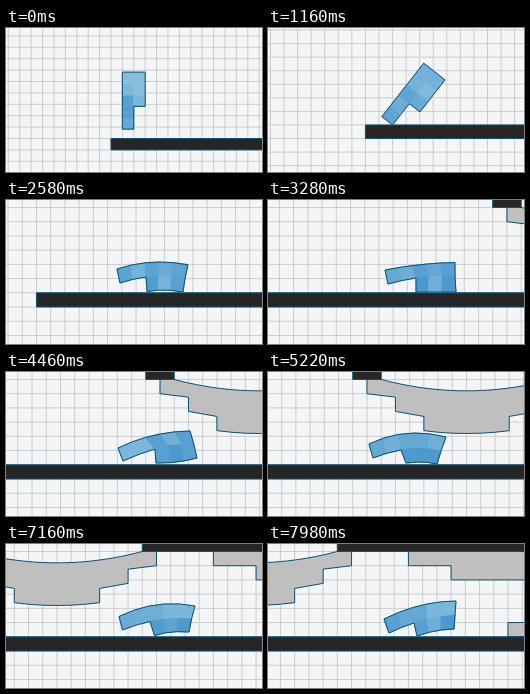
An HTML page with a canvas that plays this animation: 256x144 px, repeating every 8000 ms.

```html
<!DOCTYPE html>
<html lang="en">
<head>
<meta charset="utf-8">
<title>Soft walker</title>
<style>
html, body { margin: 0; width: 100%; height: 100%; overflow: hidden; background: #f4f5f7; }
canvas { display: block; width: 100vw; height: 100vh; }
</style>
</head>
<body>
<canvas id="stage" width="256" height="144"></canvas>
<script>
const ctx = document.getElementById('stage').getContext('2d');
const LOOP = 8000, W = 256, H = 144, CELL = W / 18;
const EDGE = '#0b5075', DARK = '#262627', SOFT = '#bfbfbf';

// [seconds, camera centre in cells]
const CAMERA = [[0, 2.02], [1, 2.15], [1.5, 2.7], [1.88, 3.73], [3.28, 10.2],
  [4.46, 16.17], [5.22, 20.04], [6.34, 25.8], [8, 35.24]];
// [seconds, gait phase]; one gait cycle is six poses
const GAIT = [[0, 0], [1.88, 0], [3.28, 13], [4.46, 20], [5.22, 27], [6.34, 34], [7.98, 47], [8, 47.15]];

// Each pose: top, middle and bottom edge through three points, then cell shades
const POSES = [
  { top: [105, 68, 147, 60, 177, 67], mid: [108, 82, 132, 76, 171, 80], low: [134, 91, 150, 88, 166, 92], shade: '36454364' },
  { top: [117, 70, 159, 64, 187, 62.5], mid: [120, 84, 148, 78, 187, 77], low: [148, 92, 167, 92, 188, 92], shade: '45343252' },
  { top: [112, 76, 154, 62, 184, 59], mid: [117, 89, 149, 77, 188, 73], low: [150, 91, 171, 90, 191, 86], shade: '66353323' },
  { top: [101, 72, 146, 61, 178, 65], mid: [105, 86, 133, 78, 173, 79], low: [138, 91, 154, 90, 169, 92], shade: '45445222' },
  { top: [110, 70, 157, 60, 190, 67], mid: [112, 83, 142, 76, 184, 79], low: [148, 91, 164, 89, 180, 91], shade: '66666222' },
  { top: [116, 75, 159, 60, 188, 57], mid: [121, 89, 146, 79, 187, 71], low: [149, 92, 167, 87, 186, 85], shade: '34466352' }
];
const UPRIGHT_SHADE = '43367677';

const mix = (a, b, k) => a + (b - a) * k;
const mixPoint = (p, q, k) => [mix(p[0], q[0], k), mix(p[1], q[1], k)];
const smooth = (a, b, t) => {
  const k = Math.min(1, Math.max(0, (t - a) / (b - a)));
  return k * k * (3 - 2 * k);
};

function segment(keys, t) {
  let i = 0;
  while (i < keys.length - 2 && t >= keys[i + 1][0]) i++;
  return [i, (t - keys[i][0]) / (keys[i + 1][0] - keys[i][0])];
}

function linear(keys, t) {
  const [i, k] = segment(keys, t);
  return mix(keys[i][1], keys[i + 1][1], k);
}

function spline(keys, t) {
  const [i, k] = segment(keys, t);
  const slope = j => {
    const a = keys[Math.max(0, j - 1)], b = keys[Math.min(keys.length - 1, j + 1)];
    return (b[1] - a[1]) / (b[0] - a[0]);
  };
  const [t0, a] = keys[i], [t1, b] = keys[i + 1], d = t1 - t0;
  return mix(a, b, k * k * (3 - 2 * k)) +
    d * k * (1 - k) * ((1 - k) * slope(i) - k * slope(i + 1));
}

// Parabola through three points placed at the given nodes
function curve(c, nodes, u) {
  const [a, b, d] = nodes;
  const wa = (u - b) * (u - d) / ((a - b) * (a - d));
  const wb = (u - a) * (u - d) / ((b - a) * (b - d));
  const wd = (u - a) * (u - b) / ((d - a) * (d - b));
  return [c[0] * wa + c[2] * wb + c[4] * wd, c[1] * wa + c[3] * wb + c[5] * wd];
}

const lattice = make => [0, 1, 2].map(row =>
  [0, 1, 2, 3, 4, 5].map(i => make(row, i)));

const posePoints = POSES.map(p => lattice((row, i) => curve(
  [p.top, p.mid, p.low][row], [[0, 3, 5], [0, 2, 5], [2, 3.5, 5]][row], i)));

const mixLattice = (a, b, k) => lattice((r, i) => mixPoint(a[r][i], b[r][i], k));
const mixShades = (a, b, k) => [...a].map((v, i) => mix(+v, +b[i], k));

function view(t) {
  const k = smooth(0.2, 1.6, t);
  const size = mix(11.4, CELL, k), ground = mix(110.5, 92.8, k), x = spline(CAMERA, t);
  return { size, ground, x, at: (cx, cy) => [W / 2 + (cx - x) * size, ground - cy * size] };
}

// Standing body tipping over its foot, in cells
function toppling(t) {
  const angle = Math.PI / 2 * Math.min(1, Math.max(0, (t - 0.45) / 1.05)) ** 2.2;
  const c = Math.cos(angle), s = Math.sin(angle);
  const body = lattice((r, i) => [2 + (r - 1) * c + i * s, i * c - (r - 1) * s]);
  const lowest = Math.min(body[0][0][1], body[1][0][1], body[2][2][1]);
  const drop = Math.max(0, 0.82 - 4 * t - 8 * t * t);
  return lattice((r, i) => [body[r][i][0], body[r][i][1] - lowest + drop]);
}

function robot(t, cam) {
  const phase = linear(GAIT, t), n = Math.floor(phase + 1e-6), k = smooth(0, 1, phase - n);
  const a = n % 6, b = (n + 1) % 6;
  let points = mixLattice(posePoints[a], posePoints[b], k);
  let shades = mixShades(POSES[a].shade, POSES[b].shade, k);
  if (t < 1.88) {
    const landed = view(1.88), fall = toppling(t), rest = smooth(1.35, 1.88, t);
    points = lattice((r, i) => {
      const [x, y] = points[r][i];
      const p = [landed.x + (x - W / 2) / CELL, (landed.ground - y) / CELL];
      return cam.at(...mixPoint(fall[r][i], p, rest));
    });
    shades = mixShades(UPRIGHT_SHADE, POSES[0].shade, smooth(0.3, 1.88, t));
  }
  return { points, shades };
}

function shape(points, fill, stroke) {
  ctx.beginPath();
  points.forEach(p => ctx.lineTo(...p));
  ctx.closePath();
  if (fill) { ctx.fillStyle = fill; ctx.fill(); }
  if (stroke) { ctx.strokeStyle = stroke; ctx.lineWidth = 1; ctx.stroke(); }
}

function drawGrid(cam) {
  ctx.fillStyle = '#f4f5f7';
  ctx.fillRect(0, 0, W, H);
  ctx.beginPath();
  const [ox, oy] = cam.at(0, 0), s = cam.size;
  for (let x = ox - Math.floor(ox / s) * s; x < W; x += s) { ctx.moveTo(x, 0); ctx.lineTo(x, H); }
  for (let y = oy % s; y < H; y += s) { ctx.moveTo(0, y); ctx.lineTo(W, y); }
  ctx.strokeStyle = '#cbccce';
  ctx.lineWidth = 1;
  ctx.stroke();
}

function drawWorld(cam) {
  const poly = (cells, fill) => shape(cells.map(p => cam.at(...p)), fill, EDGE);
  const box = (x0, y0, x1, y1, fill) => poly([[x0, y0], [x1, y0], [x1, y1], [x0, y1]], fill);

  // Sagging stepped beam, hung from both ends
  const sag = x => 0.8 * Math.max(0, 1 - ((x - 25) / 6) ** 2);
  const beam = [];
  const add = (x, y) => beam.push([x, y - sag(x)]);
  for (let x = 18; x <= 32; x += 0.5) add(x, 6);
  [[32, 5], [30, 5], [30, 4], [28, 4], [28, 3]].forEach(p => add(...p));
  for (let x = 27; x > 22; x--) add(x, 3);
  [[22, 3], [22, 4], [20, 4], [20, 5], [18, 5]].forEach(p => add(...p));
  poly(beam, SOFT);

  poly([[36, 6], [36, 5], [39, 5], [39, 4], [48, 4], [48, 6]], SOFT);
  box(43, 0, 48, 1, SOFT);
  box(17, 6, 19, 7, DARK);
  box(31, 6, 48, 7, DARK);
  box(0, -1, 48, 0, DARK);
}

function drawRobot({ points: [top, mid, low], shades }) {
  const tone = v => {
    const k = (v - 2) / 5;
    return `rgb(${mix(76, 135, k)},${mix(153, 190, k)},${mix(206, 221, k)})`;
  };
  const cell = (a, b, i, v) => {
    const quad = [a[i], a[i + 1], b[i + 1], b[i]];
    shape(quad, tone(v), tone(v));
  };
  for (let i = 0; i < 5; i++) cell(top, mid, i, shades[i]);
  for (let i = 2; i < 5; i++) cell(mid, low, i, shades[i + 3]);
  shape([...top, mid[5], ...low.slice(2).reverse(), ...mid.slice(0, 3).reverse()], null, EDGE);
}

function draw(now) {
  const t = Math.floor(now % LOOP / 20) * 0.02;
  const cam = view(t);
  drawGrid(cam);
  drawWorld(cam);
  drawRobot(robot(t, cam));
}

let start;
function tick(now) {
  start ??= now;
  draw(now - start);
  requestAnimationFrame(tick);
}
draw(0);
requestAnimationFrame(tick);
</script>
</body>
</html>
```
